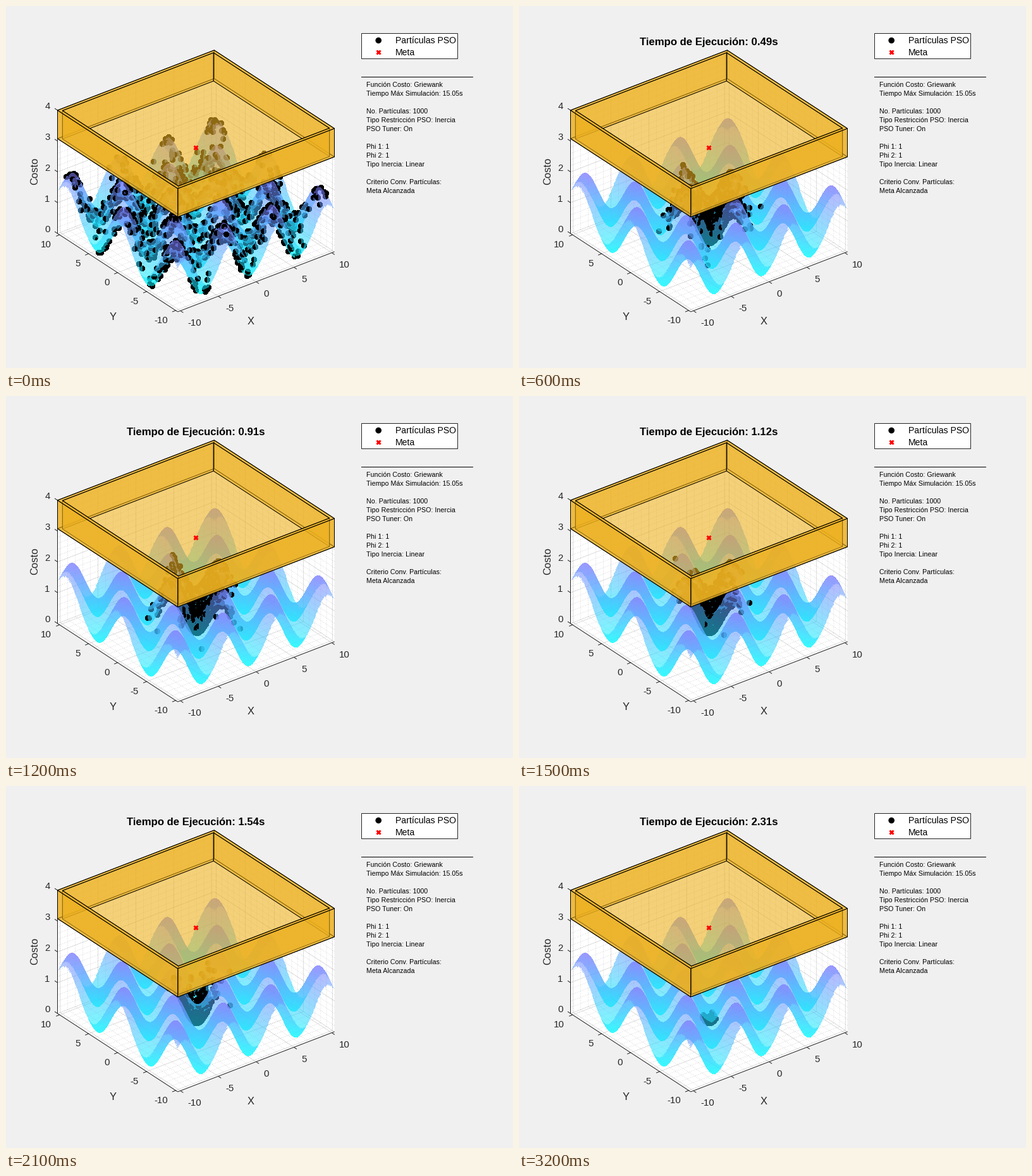
These frames come from a looping animation (802x573 px, 3300 ms). A matplotlib script:

```python
import numpy as np
import matplotlib.pyplot as plt
from matplotlib.animation import FuncAnimation
from matplotlib.collections import LineCollection
from matplotlib.patches import Circle, Polygon, Rectangle

W, H, DPI = 802, 573, 64
PX = 72 / DPI                       # one pixel in points
FRAMES, STEP_MS = 33, 100
LIM, Z_BOX, Z_TOP, WALL = 10.35, 3.08, 4.0, 0.37
INK = (0.15, 0.15, 0.15)
ORANGE = (0.929, 0.694, 0.125)
BOX_FILL = ORANGE + (0.6,)

# Orthographic camera: azimuth -37.5, elevation 30 degrees
CX, CY = 300.5, 374.5
SCALE = np.array([15.09, 15.09, 56.3])
AZ, EL = np.radians(37.5), np.radians(30)
RIGHT = np.array([np.cos(AZ), -np.sin(AZ), 0])
UP = np.array([np.sin(AZ) * np.sin(EL), np.cos(AZ) * np.sin(EL), np.cos(EL)])
AWAY = np.array([np.sin(AZ) * np.cos(EL), np.cos(AZ) * np.cos(EL), -np.sin(EL)])


def project(x, y, z):
    p = np.stack(np.broadcast_arrays(x, y, z), -1) * SCALE
    return np.stack([CX + p @ RIGHT, CY - p @ UP], -1)


def griewank(x, y):
    return 1 + (x * x + y * y) / 4000 - np.cos(x) * np.cos(y / np.sqrt(2))


# ---- surface: depth and height of every layer behind each pixel
X0, X1, Y0, Y1 = 40, 560, 150, 510
LAYERS, ALPHA = 12, 0.55


def trace_surface(step=2.0):
    u = (np.arange(X0, X1) + 0.5 - CX)[None, :]
    v = (CY - np.arange(Y0, Y1) - 0.5)[:, None]
    base = [((u * RIGHT[i] + v * UP[i]) / SCALE[i]).astype(np.float32) for i in range(3)]
    slope = (AWAY / SCALE).astype(np.float32)
    shape = base[0].shape
    depth = np.full((LAYERS,) + shape, np.inf, np.float32)
    level = np.zeros((LAYERS,) + shape, np.float32)
    count = np.zeros(shape, int)
    prev = np.full(shape, np.nan, np.float32)
    for d in np.arange(-250, 196, step, dtype=np.float32):
        x, y, z = (b + d * s for b, s in zip(base, slope))
        h = griewank(x, y)
        inside = (np.abs(x) <= LIM) & (np.abs(y) <= LIM)
        gap = np.where(inside, z - h, np.float32(np.nan))
        hit = gap * prev < 0
        r, c = np.nonzero(hit)
        k = np.minimum(count[r, c], LAYERS - 1)
        a, b = np.abs(gap[r, c]), np.abs(prev[r, c])
        depth[k, r, c] = d - step * a / (a + b)
        level[k, r, c] = h[r, c]
        count[r, c] += 1
        prev = gap
    return depth, level


DEPTH, LEVEL = trace_surface()


def blend(depth, level, limit):
    """Composite the layers nearer than limit; return colour and leftover light."""
    rgb = np.zeros(depth.shape[1:] + (3,), np.float32)
    left = np.ones(depth.shape[1:], np.float32)
    for d, z in zip(depth, level):
        a = np.where(d < limit, ALPHA, 0)
        t = np.clip(z / Z_TOP, 0, 1)
        rgb += (left * a)[..., None] * np.stack([t, 1 - t, np.ones_like(t)], -1)
        left = left * (1 - a)
    return rgb, left


rgb, left = blend(DEPTH, LEVEL, 1e6)
cover = 1 - left
BASE = np.dstack([rgb / np.maximum(cover, 1e-6)[..., None], cover])

# ---- swarm
N = 1000
rng = np.random.RandomState(4)
START = rng.uniform(-10, 10, (N, 2))
SWING_A, SWING_B = rng.normal(size=(2, N, 2))
STRAGGLERS = 60
oy, ox = np.mgrid[-5:6, -5:6]
disc = ox ** 2 + oy ** 2 <= 4.8 ** 2
OX, OY = ox[disc], oy[disc]


def swarm(k):
    if k == 0:
        return START
    core = np.interp(k, [1, 2, 3, 12, 18, 25, 32], [5, 2.8, 1.6, 1.6, 0.75, 0.45, 0.22])
    tail = np.interp(k, [1, 2, 3, 12, 18, 25, 29, 32], [5, 2.8, 1.6, 1.6, 1.8, 1.0, 0.3, 0.22])
    size = np.where(np.arange(N) < STRAGGLERS, tail, core)[:, None]
    return size * (SWING_A * np.cos(0.9 * k) + SWING_B * np.sin(0.9 * k))


def render(k):
    x, y = swarm(k).T
    z = griewank(x, y)
    away = (np.stack([x, y, z], -1) * SCALE) @ AWAY
    pos = np.floor(project(x, y, z)).astype(int)
    col = pos[:, :1] - X0 + OX
    row = pos[:, 1:] - Y0 + OY
    ok = (col >= 0) & (col < X1 - X0) & (row >= 0) & (row < Y1 - Y0)
    near = np.full(BASE.shape[:2], np.inf)
    np.minimum.at(near, (row[ok], col[ok]), np.broadcast_to(away[:, None], ok.shape)[ok])
    m = np.isfinite(near)
    img = BASE.copy()
    img[m, :3] = blend(DEPTH[:, m], LEVEL[:, m], near[m])[0]
    img[m, 3] = 1
    return np.clip(img, 0, 1)


# ---- stage; half coordinates are pixel centres, so snapping stays off
fig = plt.figure(figsize=(W / DPI, H / DPI), dpi=DPI, facecolor="#f0f0f0")
ax = fig.add_axes([0, 0, 1, 1])
ax.axis("off")


def text(x, y, s, size, **kw):
    kw = {"color": "black", "va": "baseline", **kw}
    return ax.text(x, y, s, fontsize=size * PX, family="Liberation Sans", **kw)


def lines(segs, z, color, width=1.0, **kw):
    ax.add_collection(LineCollection(segs, colors=[color], linewidths=width * PX,
                                     zorder=z, snap=False, **kw))


def face(pts, z, color, edge="none"):
    ax.add_patch(Polygon(project(*np.transpose(pts)), closed=True, facecolor=color,
                         edgecolor=edge, lw=PX, joinstyle="round", zorder=z, snap=False))


def seg(a, b):
    return project(*np.transpose([a, b]))


def grid(xy, zs):
    out = []
    for t in xy:
        out += [seg((t, -LIM, 0), (t, LIM, 0)), seg((-LIM, t, 0), (LIM, t, 0)),
                seg((t, LIM, 0), (t, LIM, 4)), seg((LIM, t, 0), (LIM, t, 4))]
    for z in zs:
        out += [seg((-LIM, LIM, z), (LIM, LIM, z)), seg((LIM, -LIM, z), (LIM, LIM, z))]
    return out


# axes walls, grid, rulers
L = LIM
face([(-L, -L, 0), (-L, L, 0), (-L, L, 4), (L, L, 4), (L, -L, 4), (L, -L, 0)], 1, "white")
lines(grid(range(-10, 11), np.arange(0, 4.01, 0.2)), 2, (0.1, 0.1, 0.1, 0.25), 0.8,
      linestyles=[(0, (1, 2.5))])
lines(grid(range(-10, 11, 5), range(5)), 2, (0.15, 0.15, 0.15, 0.12), 0.8)
lines([seg((-L, L, 0), (-L, -L, 0)), seg((-L, -L, 0), (L, -L, 0)),
       seg((-L, L, 0), (-L, L, 4))], 3, INK)

ticks = []
for t in range(-10, 11, 5):
    px, py = project(t, -L, 0)
    ticks.append([(px, py), (px + 4.5, py + 3)])
    text(px + 11.5, py + 23.3, str(t), 15, color=INK)
    px, py = project(-L, t, 0)
    ticks.append([(px, py), (px - 5.5, py + 2.2)])
    text(px - 12.5, py + 20.2, str(t), 15, color=INK, ha="right")
for t in range(5):
    px, py = project(-L, L, t)
    ticks.append([(px, py), (px - 4.5, py - 3)])
    text(px - 12, py - 1.8, str(t), 15, color=INK, ha="right")
lines(ticks, 3, INK)
text(387.5, 504, "X", 16.5, color=INK, ha="center")
text(169.5, 497, "Y", 16.5, color=INK, ha="center")
text(45.5, 261, "Costo", 16.5, color=INK, ha="center", va="center", rotation=90)

# surface and swarm
picture = ax.imshow(BASE, extent=(X0, X1, Y1, Y0), interpolation="nearest",
                    aspect="auto", zorder=4)

# open box above the surface, painted from back to front
def corners(r):
    return [(-r, -r), (-r, r), (r, r), (r, -r)]


def wall(r, i, z):
    a, b = corners(r)[i], corners(r)[(i + 1) % 4]
    face([a + (Z_BOX,), b + (Z_BOX,), b + (Z_TOP,), a + (Z_TOP,)], z, BOX_FILL, "black")


IN = LIM - WALL
face([c + (Z_BOX,) for c in corners(L)], 5, BOX_FILL, "black")
for z, r, sides in ((6, L, (1, 2)), (7, IN, (1, 2)), (8, IN, (0, 3)), (9, L, (0, 3))):
    for i in sides:
        wall(r, i, z)
outer, inner = corners(L), corners(IN)
for i in range(4):
    j = (i + 1) % 4
    face([p + (Z_TOP,) for p in (outer[i], outer[j], inner[j], inner[i])], 10, BOX_FILL)
for ring in (outer, inner):
    face([p + (Z_TOP,) for p in ring], 11, "none", "black")


def cross(x, y):
    ax.plot(x, y, "x", color="red", ms=6.5 * PX, mew=3 * PX, zorder=14, snap=False)


cross(300, 223.9)

# legend and run settings
ax.add_patch(Rectangle((562.5, 43.5), 152, 40, facecolor="white", edgecolor=INK,
                       lw=PX, zorder=12, snap=False))
ax.add_patch(Circle((589.2, 54.5), 4.8, color="black", lw=0, zorder=13))
cross(589.2, 72.5)
text(616, 59, "Partículas PSO", 14, zorder=13)
text(616, 78, "Meta", 14, zorder=13)
lines([[(562, 112.5), (739, 112.5)]], 12, "black")
NOTES = """Función Costo: Griewank
Tiempo Máx Simulación: 15.05s

No. Partículas: 1000
Tipo Restricción PSO: Inercia
PSO Tuner: On

Phi 1: 1
Phi 2: 1
Tipo Inercia: Linear

Criterio Conv. Partículas:
Meta Alcanzada"""
for i, note in enumerate(NOTES.split("\n")):
    text(570, 128.5 + 14 * i, note, 10.68)

title = text(300.5, 62, "", 16.7, weight="bold", ha="center", zorder=15)
ax.set_xlim(0, W)
ax.set_ylim(H, 0)


def update(k):
    picture.set_data(render(k))
    title.set_text(f"Tiempo de Ejecución: {0.07 * (k + 1):.2f}s" if k else "")
    return picture, title


anim = FuncAnimation(fig, update, frames=FRAMES, interval=STEP_MS, repeat=True,
                     repeat_delay=0, blit=False)
plt.show()
```
